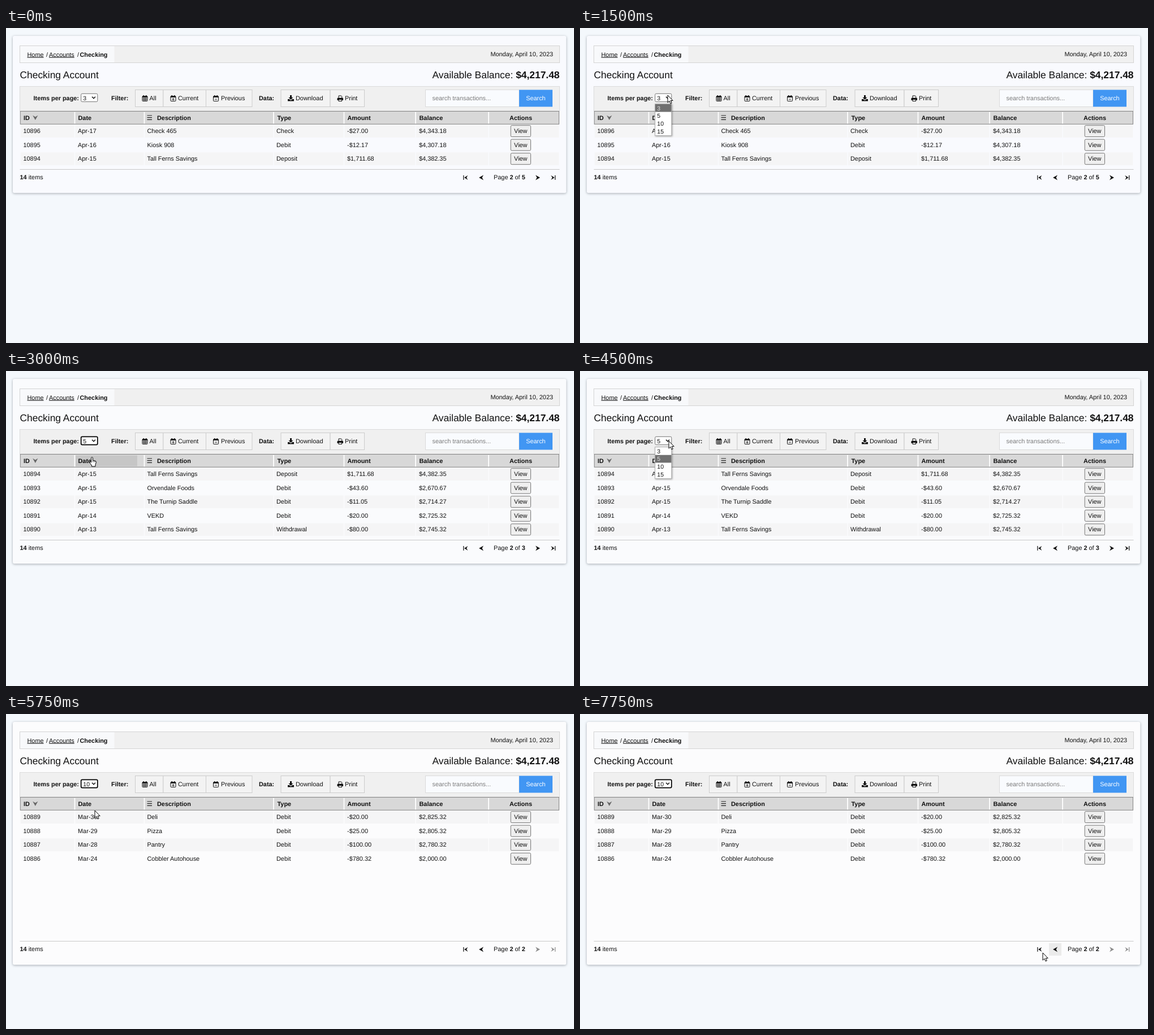
Write an HTML page that moves like this. It is 1004x558 px and loops after 8000 ms.

```html
<!DOCTYPE html>
<html lang="en">
<head>
<meta charset="utf-8">
<title>Checking Account</title>
<style>
html, body { margin: 0; width: 100%; height: 100%; overflow: hidden; background: #f4f8fc; }
svg { display: block; width: 100vw; height: 100vh; }
text { font: 10.9px Arial, "Liberation Sans", sans-serif; fill: #111; white-space: pre; text-rendering: geometricPrecision; }
.b, .b tspan, tspan.b { font-weight: bold; }
.u { text-decoration: underline; }
.h { font-size: 17.4px; }
.s { font-size: 10.5px; }
.end { text-anchor: end; }
.mid { text-anchor: middle; }
.card { filter: drop-shadow(0 1px 2px rgba(40, 50, 60, .4)); }
.menu { filter: drop-shadow(1px 1px 1.5px rgba(0, 0, 0, .35)); }
</style>
</head>
<body>
<svg id="stage" viewBox="0 0 1004 558"></svg>
<script>
const LOOP = 8000, STEP = 250;
const stage = document.getElementById('stage');

const EDGES = [25, 121.5, 244.5, 473, 597.5, 724, 853, 978];
const CELL_X = [30.5, 127, 249.5, 478, 603, 730];
const HEADERS = [[31, 'ID'], [127.5, 'Date'], [267, 'Description'], [479.5, 'Type'], [603.5, 'Amount'], [730.5, 'Balance']];
const SIZES = [3, 5, 10, 15];

const deposit = '10894|Apr-15|Tall Ferns Savings|Deposit|$1,711.68|$4,382.35';
const VIEWS = [
  { start: 0, size: 3, pages: 5, line: 250.5, fill: '#f9fafe', rows: [
    '10896|Apr-17|Check 465|Check|-$27.00|$4,343.18',
    '10895|Apr-16|Kiosk 908|Debit|-$12.17|$4,307.18',
    deposit] },
  { start: 3000, size: 5, pages: 3, line: 299.5, fill: '#fafbfd', rows: [
    deposit,
    '10893|Apr-15|Orvendale Foods|Debit|-$43.60|$2,670.67',
    '10892|Apr-15|The Turnip Saddle|Debit|-$11.05|$2,714.27',
    '10891|Apr-14|VEKD|Debit|-$20.00|$2,725.32',
    '10890|Apr-13|Tall Ferns Savings|Withdrawal|-$80.00|$2,745.32'] },
  { start: 5750, size: 10, pages: 2, line: 402.5, fill: '#fcfcfd', rows: [
    '10889|Mar-30|Deli|Debit|-$20.00|$2,825.32',
    '10888|Mar-29|Pizza|Debit|-$25.00|$2,805.32',
    '10887|Mar-28|Pantry|Debit|-$100.00|$2,780.32',
    '10886|Mar-24|Cobbler Autohouse|Debit|-$780.32|$2,000.00'] }
];

// Held pointer positions: time, x, y, and "hand" where it is not an arrow
const POINTER = [
  [250, 342, 104], [500, 268, 111], [750, 196, 117], [1000, 155, 119],
  [1750, 154, 131], [2000, 152, 146], [2250, 150, 152],
  [3000, 152, 152.5, 'hand'], [3250, 155, 136], [3500, 157, 124],
  [4750, 157, 142], [5000, 157, 160], [5250, 157, 171],
  [6250, 180, 196], [6500, 330, 310], [6750, 560, 420], [7000, 750, 461],
  [7250, 846, 452], [7500, 840, 417, 'hand'], [7750, 818, 423]
];
// Open menu: time and highlighted size, 0 when closed
const MENU = [[0, 0], [1500, 3], [2000, 5], [2500, 0], [4500, 5], [5000, 10], [5500, 0]];

const at = (keys, t) => keys.filter(k => k[0] <= t).pop();
const text = (x, y, s, cls = '', fill = '#111') => `<text x="${x}" y="${y}" class="${cls}" style="fill:${fill}">${s}</text>`;
const box = (x, y, x2, y2, fill, stroke = 'none', r = 0, w = 1) =>
  `<rect x="${x}" y="${y}" width="${x2 - x}" height="${y2 - y}" rx="${r}" fill="${fill}" stroke="${stroke}" stroke-width="${w}"/>`;
const path = (d, fill, stroke = 'none', w = 1) => `<path d="${d}" fill="${fill}" stroke="${stroke}" stroke-width="${w}"/>`;
const move = (x, y, s) => `<g transform="translate(${x} ${y})">${s}</g>`;
const bold = s => `<tspan class="b">${s}</tspan>`;

const calendar = (x, mark) => move(x, 119,
  box(.5, 2, 9.5, 10.5, 'none', '#111', .8) + box(.5, 1.5, 9.5, 4, '#111') +
  path('M2.8 0V3M7.2 0V3', 'none', '#111', 1.4) + path(mark, 'none', '#111', .9));

const icons = {
  all: calendar(240.5, 'M3.5 4V10M6.5 4V10M1 6H9M1 8.2H9'),
  current: calendar(290.5, 'M5 5V9.5M2.8 7.2H7.2'),
  previous: calendar(366, 'M2.8 7.2H7.2'),
  download: move(498, 119,
    path('M4 0H7V4H9.5L5.5 8L1.5 4H4Z', '#111') + path('M0 7H2.8L5.5 9.3L8.2 7H11V10.5H0Z', '#111')),
  print: move(585.5, 119.5,
    path('M2.5 5V.5H7L8.2 1.8V5', 'none', '#111') + path('M0 5.5Q0 4.3 1 4.3H9.5Q10.5 4.3 10.5 5.5V8.5H0Z', '#111') +
    box(2.5, 7, 8, 10, '#f3f3f3', '#111'))
};

const button = (x, x2, icon, tx, label) =>
  box(x, 109.5, x2, 139.5, '#f3f3f3', '#ccc') + icons[icon] + text(tx, 128.3, label);

function header() {
  return box(24.5, 31.5, 978.5, 61.5, '#f0f0f0', '#d4d4d4') + box(25, 32, 191.5, 61, '#f8f9fb') +
    text(37.5, 50.5, 'Home', 'u') + text(71, 50.5, '/') + text(76, 50.5, 'Accounts', 'u') +
    text(126, 50.5, '/') + text(130.5, 50.5, 'Checking', 'b') +
    text(967, 50, 'Monday, April 10, 2023', 'end') +
    text(24.5, 89, 'Checking Account', 'h') +
    text(978.5, 89, 'Available Balance: ' + bold('$4,217.48'), 'h end');
}

function toolbar(size, focused) {
  return box(24.5, 103.5, 978.5, 147, '#f0f0f0', '#dcdcdc') +
    text(48.5, 128, 'Items per page:', 'b') +
    box(132.7, 116.3, 161.8, 130.6, '#fff', focused ? '#000' : '#767676', 2, focused ? 1.7 : 1) +
    text(136.3, 127.5, size, 's') + path('M152 121.8L155 124.8L158 121.8', 'none', '#111', 1.5) +
    text(186, 128, 'Filter:', 'b') +
    button(228.5, 277.9, 'all', 253.5, 'All') +
    button(277.9, 353.5, 'current', 304, 'Current') +
    button(353.5, 435, 'previous', 380, 'Previous') +
    text(447, 128, 'Data:', 'b') +
    button(486, 573, 'download', 512, 'Download') +
    button(573, 633.5, 'print', 599, 'Print') +
    box(741.5, 109.5, 907, 139.5, '#f9fbfe', '#dadada') +
    text(753.5, 128.3, 'search transactions...', '', '#7a7a7a') +
    box(907, 109.5, 966, 139.5, '#4196f3') + text(936.4, 128.3, 'Search', 'mid', '#fff');
}

function table(rows, hoverDate) {
  let s = box(25.3, 147.5, 977.5, 170.3, '#d8d8d8', '#858585');
  if (hoverDate) s += box(123, 149.5, 232, 168.5, '#c6c6c6');
  for (const x of EDGES.slice(1, -1)) s += box(x - .9, 149, x + .9, 169.3, '#fff');
  for (const [x, label] of HEADERS) s += text(x, 162.8, label, 'b');
  s += text(910, 162.8, 'Actions', 'b mid') +
    path('M47.2 154.8L51.8 163L56.4 154.8L51.8 157.4Z', '#666') +
    path('M249.5 155H258M249.5 158.7H258M249.5 162.4H258', 'none', '#222', 1.2);
  rows.forEach((row, i) => {
    const y = 182.4 + 24.55 * i;
    if (i % 2 == 0)
      for (let c = 0; c < 7; c++) s += box(EDGES[c] + .8, y - 11, EDGES[c + 1] - .8, y + 11.6, '#f5f5f6');
    row.split('|').forEach((cell, c) => s += text(CELL_X[c], y + 3.7, cell));
    s += box(892.2, y - 9.8, 927.5, y + 10.2, '#efefef', '#767676', 2) + text(909.8, y + 3.7, 'View', 'mid');
  });
  return s;
}

function footer({ line, pages }, hoverPrev) {
  const off = pages == 2 ? '#8c8c8c' : '#111';
  const left = 'M8 -4.5L0 0L8 4.5L5.5 0Z', right = 'M0 -4.5L8 0L0 4.5L2.5 0Z';
  const y = line + 14.5;
  return path(`M24.5 ${line}H978.5`, 'none', '#c8c8c8') +
    text(24.5, line + 17.8, bold('14') + ' items') +
    (hoverPrev ? box(829, y - 11, 851, y + 11, '#ebebeb') : '') +
    move(808, y, path('M.8 -4V4', 'none', '#111', 1.2) + path('M8.3 -4L2 0L8.3 4L6 0Z', '#111')) +
    move(836, y, path(left, '#111')) +
    text(862, line + 17.8, `Page ${bold(2)} of ${bold(pages)}`) +
    move(936, y, path(right, off)) +
    move(963, y, path('M7.7 -4V4', 'none', off, 1.2) + path('M.3 -4L6.6 0L.3 4L2.6 0Z', off));
}

function menu(active) {
  let s = box(132.7, 134.7, 161.8, 190.6, '#fff', '#b0b0b0');
  SIZES.forEach((n, i) => {
    const y = 134.9 + 13.85 * i, on = n == active;
    if (on) s += box(133, y, 161.5, y + 13.7, '#707070');
    s += text(136.3, y + 10.6, n, 's', on ? '#e0e0e0' : '#111');
  });
  return `<g class="menu">${s}</g>`;
}

function pointer([, x, y, kind]) {
  return move(x, y, kind
    ? path('M-1.4 1Q0 -1 1.4 1V5.6L6 6.8Q7.6 7.3 7.4 9.3L6 13.5V16.5H-.6V14.5L-4.2 9.8Q-4 7.8 -2.3 8.6L-1.4 9.6Z', '#fff', '#000') +
      path('M1.4 6V9M3.6 6.5V9M5.6 7V9', 'none', '#000', .7)
    : path('M0 0V13.2L3 10.4L5 15L7.2 14L5.2 9.6H9.2Z', '#fff', '#000'));
}

function scene(t) {
  const view = VIEWS.filter(v => v.start <= t).pop();
  const active = at(MENU, t)[1], mouse = at(POINTER, t);
  const focused = t >= 3000 && t < 4500 || t >= 5750;
  return `<g class="card">${box(12, 14, 990.3, view.line + 41.7, view.fill, 'none', 3)}</g>` +
    header() + toolbar(view.size, focused) +
    table(view.rows, t == 3000) + footer(view, t >= 7500) +
    (active ? menu(active) : '') + (mouse ? pointer(mouse) : '');
}

let shown = -1;
function tick(now) {
  const t = Math.floor(now % LOOP / STEP) * STEP;
  if (t != shown) stage.innerHTML = scene(shown = t);
  requestAnimationFrame(tick);
}
tick(performance.now());
</script>
</body>
</html>
```
